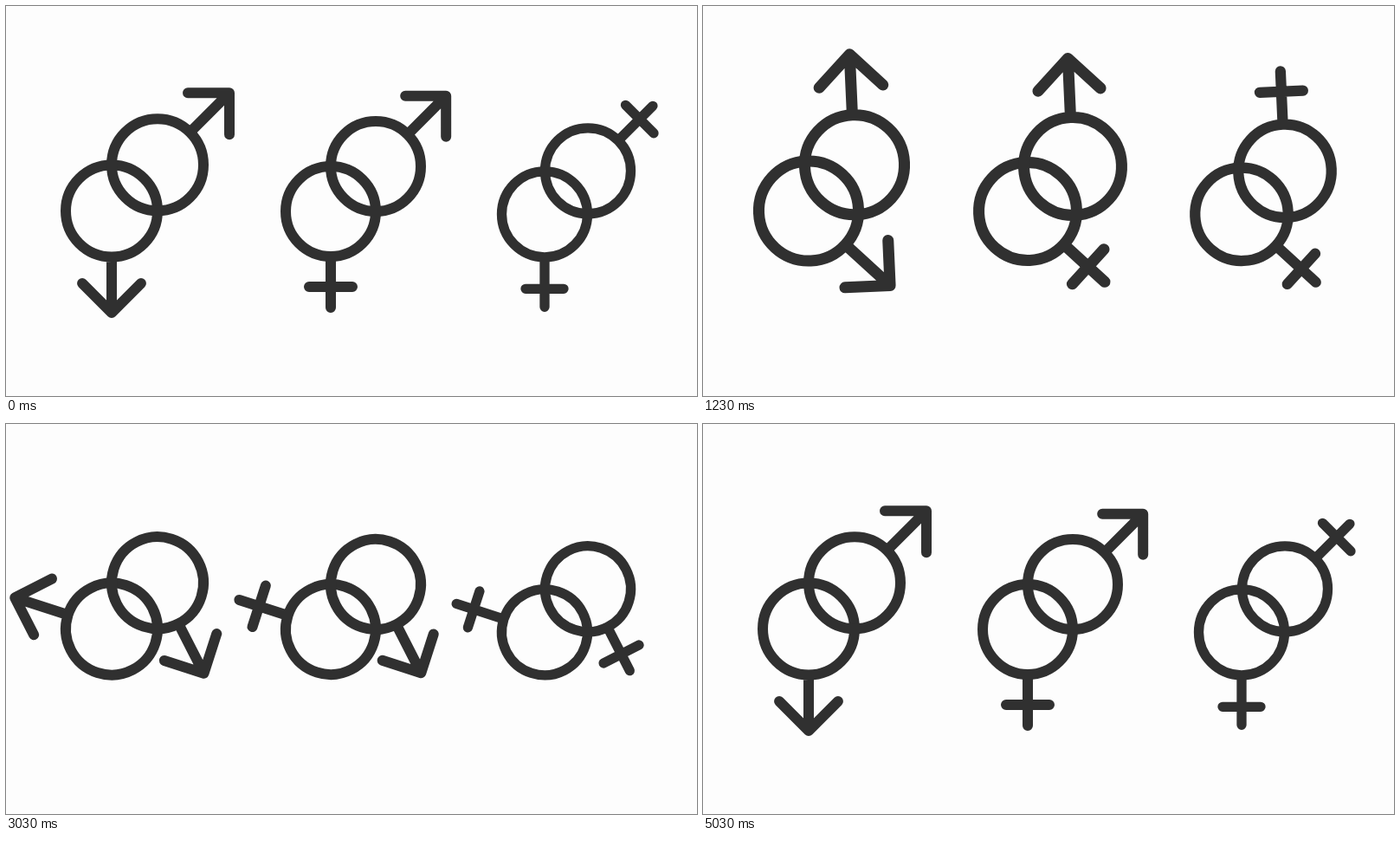
An HTML page with a canvas that plays this animation: 798x450 px, repeating every 5.06 s.

```html
<!DOCTYPE html>
<html lang="en">
<head>
<meta charset="utf-8">
<title>Turning symbols</title>
<style>
html, body { margin: 0; width: 100%; height: 100%; overflow: hidden; background: #fdfdfd; }
canvas { display: block; }
</style>
</head>
<body>
<canvas id="stage" width="798" height="450"></canvas>
<script>
const ctx = document.getElementById('stage').getContext('2d');
const INK = '#303030';
const PAPER = '#fdfdfd';
const LOOP = 5060;
const CYCLE = 2533;
const SPIN = 1500;
const SWELL = { from: 833, peak: 1167, to: 1500, size: 0.1 };

const DOWN = Math.PI / 2;
const UP_RIGHT = -Math.PI / 4;

// Each symbol: centre, rest angle, ring radius, line width, head
const arrow = (tip, barb) => ({ tip, barb });
const cross = (tip, at, half) => ({ tip, at, half });
const symbols = [
  { x: 122, y: 236.5, rest: DOWN, r: 53, w: 12, head: arrow(117.4, 48) },
  { x: 175, y: 183.2, rest: UP_RIGHT, r: 53, w: 12, head: arrow(117.4, 48) },
  { x: 375, y: 237, rest: DOWN, r: 52, w: 12, head: cross(111, 87, 25) },
  { x: 427, y: 185, rest: UP_RIGHT, r: 52, w: 12, head: arrow(114.8, 47) },
  { x: 622, y: 240.3, rest: DOWN, r: 49.5, w: 11.3, head: cross(107, 86, 22) },
  { x: 672, y: 190.3, rest: UP_RIGHT, r: 49.5, w: 11.3, head: cross(106, 84.5, 23) }
];

// Cubic bezier timing (1/6, 0, 5/6, 1), solved by bisection
function ease(x) {
  if (x <= 0) return 0;
  if (x >= 1) return 1;
  let lo = 0, hi = 1, s = 0.5;
  for (let i = 0; i < 24; i++) {
    s = (lo + hi) / 2;
    const q = 1 - s;
    const bx = 0.5 * s * q * q + 2.5 * s * s * q + s * s * s;
    if (bx < x) lo = s; else hi = s;
  }
  return s * s * (3 - 2 * s);
}

const between = (t, a, b) => ease((t - a) / (b - a));

function drawSymbol(sym, turn, scale) {
  const { head } = sym;
  ctx.save();
  ctx.translate(sym.x, sym.y);
  ctx.rotate(sym.rest + turn);
  ctx.scale(scale, scale);
  ctx.lineWidth = sym.w;
  ctx.beginPath();
  ctx.arc(0, 0, sym.r, 0, Math.PI * 2);
  ctx.moveTo(sym.r, 0);
  ctx.lineTo(head.tip, 0);
  if (head.barb) {
    const d = head.barb * Math.SQRT1_2;
    ctx.moveTo(head.tip - d, -d);
    ctx.lineTo(head.tip, 0);
    ctx.lineTo(head.tip - d, d);
  } else {
    ctx.moveTo(head.at, -head.half);
    ctx.lineTo(head.at, head.half);
  }
  ctx.stroke();
  ctx.restore();
}

function render(time) {
  const t = (time % LOOP) % CYCLE;
  const turn = between(t, 0, SPIN) * Math.PI * 2;
  const swell = between(t, SWELL.from, SWELL.peak) - between(t, SWELL.peak, SWELL.to);
  ctx.fillStyle = PAPER;
  ctx.fillRect(0, 0, 798, 450);
  ctx.strokeStyle = INK;
  ctx.lineCap = 'round';
  ctx.lineJoin = 'round';
  for (const sym of symbols) drawSymbol(sym, turn, 1 + SWELL.size * swell);
}

let start = null;
function tick(now) {
  if (start === null) start = now;
  render(Math.max(0, now - start));
  requestAnimationFrame(tick);
}
render(0);
requestAnimationFrame(tick);
</script>
</body>
</html>
```
